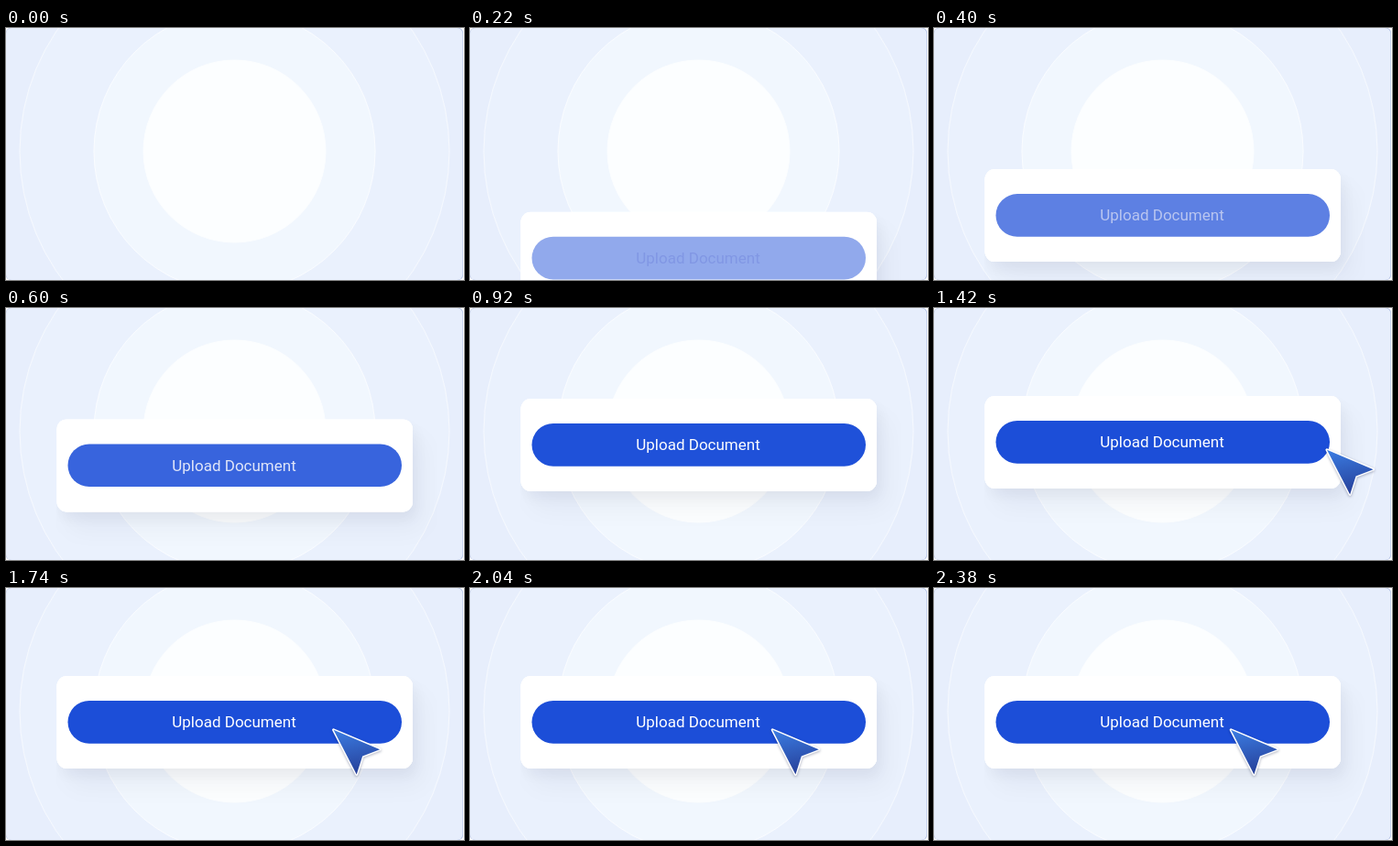
Animation of 500x275 px, one loop 2.4 s. Source, as an HTML page with a canvas:

```html
<!DOCTYPE html>
<html lang="en">
<head>
<meta charset="utf-8">
<title>Upload Document</title>
<style>
  html, body { margin: 0; width: 100%; height: 100%; overflow: hidden; background: #fff; }
  canvas { display: block; }
</style>
</head>
<body>
<canvas id="stage" width="500" height="275"></canvas>
<script>
const ctx = document.getElementById('stage').getContext('2d');
const LOOP = 2400;
const CURSOR_START = 1200;
const BLUE = [28, 78, 216];
const DEEP_BLUE = [10, 52, 202];
const WHITE = [255, 255, 255];

// Share of the way still to go: a cubic ease-out that is slightly under way at 0.
const remaining = ms => Math.max(0, 1 - (ms + 30) / 1260) ** 3;

const mix = (a, b, p) =>
  `rgb(${a.map((v, i) => Math.round(v + (b[i] - v) * p)).join(',')})`;

function roundRect(x, y, w, h, r, fill) {
  ctx.beginPath();
  ctx.roundRect(x, y, w, h, r);
  ctx.fillStyle = fill;
  ctx.fill();
}

function disc(r, fill, edge) {
  ctx.beginPath();
  ctx.arc(249.5, 134.5, r, 0, Math.PI * 2);
  ctx.fillStyle = fill;
  ctx.fill();
  ctx.strokeStyle = edge;
  ctx.lineWidth = 1;
  ctx.stroke();
}

function drawBackground() {
  ctx.fillStyle = '#fff';
  ctx.fillRect(0, 0, 500, 275);
  ctx.save();
  roundRect(0, 0, 499, 275, 5, '#b4c3e6');
  ctx.beginPath();
  ctx.roundRect(0, 0, 498.4, 275, 6);
  ctx.clip();
  ctx.fillStyle = '#e7eefc';
  ctx.fillRect(0, 0, 500, 275);
  disc(234.5, '#eaf1fd', '#f6f9fe');
  disc(153.5, '#f1f7fe', '#fafcff');
  disc(99.5, '#fcfeff', '#fcfeff');
  ctx.restore();
}

function drawCardShadow(y) {
  ctx.save();
  ctx.beginPath();
  ctx.rect(55, y, 416, 145);
  ctx.clip();
  for (const [dx, dy, blur, alpha] of [[4, 8, 14, 0.045], [12, 20, 28, 0.04]]) {
    ctx.shadowColor = `rgba(20,25,40,${alpha})`;
    ctx.shadowOffsetX = dx;
    ctx.shadowOffsetY = dy;
    ctx.shadowBlur = blur;
    roundRect(55.5, y, 388.5, 101, 11, '#fff');
  }
  ctx.restore();
}

function drawCard(ms) {
  const rest = remaining(ms);
  const y = 96 + 204 * rest;
  drawCardShadow(y);
  roundRect(55.5, y, 388.5, 101, 11, '#fff');
  roundRect(67.5, y + 27, 364.5, 46.7, 23.35, mix(WHITE, BLUE, 1 - rest));
  ctx.font = '17px Roboto, sans-serif';
  ctx.textAlign = 'center';
  ctx.fillStyle = mix(DEEP_BLUE, WHITE, 1 - rest);
  ctx.fillText('Upload Document', 249, y + 56.2);
}

function drawCursor(ms) {
  if (ms < 0) return;
  ctx.save();
  ctx.translate(322 + 204 * remaining(ms), 153);
  const fill = ctx.createLinearGradient(16, 0, 26, 51);
  fill.addColorStop(0, '#3b7ce2');
  fill.addColorStop(1, '#263f98');
  ctx.beginPath();
  ctx.moveTo(2.2, 1.8);
  ctx.lineTo(52.8, 23.2);
  ctx.lineTo(33.8, 30.4);
  ctx.lineTo(27.4, 50.4);
  ctx.closePath();
  ctx.lineJoin = 'round';
  ctx.lineWidth = 3;
  ctx.strokeStyle = '#fff';
  ctx.shadowColor = 'rgba(20,30,70,0.35)';
  ctx.shadowBlur = 3;
  ctx.shadowOffsetY = 1;
  ctx.stroke();
  ctx.shadowColor = 'transparent';
  ctx.fillStyle = fill;
  ctx.fill();
  ctx.restore();
}

const start = performance.now();

function frame(now) {
  const ms = Math.max(0, now - start) % LOOP;
  drawBackground();
  drawCard(ms);
  drawCursor(ms - CURSOR_START);
  requestAnimationFrame(frame);
}
requestAnimationFrame(frame);
</script>
</body>
</html>
```
